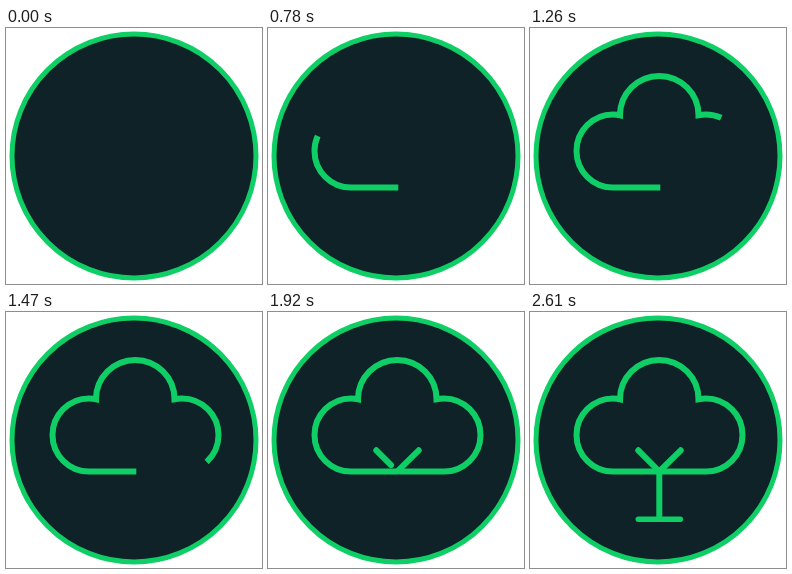
Animation, 256 px wide and 256 px high, one loop 3300 ms. Source, as an HTML page:

```html
<!DOCTYPE html>
<html lang="en">
<head>
<meta charset="utf-8">
<title>Cloud tree</title>
<style>
html, body { margin: 0; width: 100%; height: 100%; overflow: hidden; background: #fff; }
svg { display: block; width: 100%; height: 100%; }
</style>
</head>
<body>
<svg viewBox="0 0 256 256" fill="none" stroke="#10ce66" stroke-width="6">
  <circle cx="128" cy="128" r="122" fill="#0e2228" stroke-width="5"/>
  <path id="cloud" stroke-miterlimit="10" d="M130.3 159.5H83A36.5 36.5 0 0 1 83 86.5Q86.700 86.500 90 87.200A39 39 0 0 1 168.500 87.200Q172 86.500 176 86.500A36.500 36.500 0 0 1 176 159.500H130"/>
  <g stroke-linecap="round">
    <path id="left"/>
    <path id="right"/>
    <path id="trunk"/>
    <path id="base"/>
  </g>
</svg>
<script>
const LOOP = 3300;
const el = id => document.getElementById(id);
const cloud = el("cloud");
const total = cloud.getTotalLength();
const span = (t, a, b) => Math.min(1, Math.max(0, (t - a) / (b - a)));

// cubic-bezier(.42, 0, .58, 1), solved by bisection
function easeInOut(x) {
  if (x <= 0 || x >= 1) return x;
  let lo = 0, hi = 1, s = 0.5;
  for (let i = 0; i < 24; i++) {
    s = (lo + hi) / 2;
    const bx = 3 * s * (1 - s) * (0.42 * (1 - s) + 0.58 * s) + s * s * s;
    if (bx < x) lo = s; else hi = s;
  }
  return s * s * (3 - 2 * s);
}
const easeOut = x => 1 - Math.pow(1 - x, 4);

function line(id, x1, y1, x2, y2, p, width = 6) {
  const node = el(id);
  node.style.display = p > 0 ? "" : "none";
  node.setAttribute("d", `M${x1} ${y1}L${x1 + (x2 - x1) * p} ${y1 + (y2 - y1) * p}`);
  node.setAttribute("stroke-width", width);
}

function draw(t) {
  const p = easeInOut(span(t, 120, 1990));
  cloud.style.display = p > 0 ? "" : "none";
  cloud.setAttribute("stroke-dasharray", p < 1 ? `${total * p} ${total * 2}` : "none");

  line("left", 108.3, 138.3, 129.3, 159.5, easeInOut(span(t, 1660, 2080)), 6 * span(t, 1610, 1730));
  line("right", 150.7, 138.3, 129.3, 159.5, easeInOut(span(t, 1560, 1980)));
  line("trunk", 129.3, 160, 129.3, 207, easeInOut(span(t, 1930, 2150)));

  const half = 21 * easeOut(span(t, 2100, 2620));
  line("base", 129.3 - half, 207.2, 129.3 + half, 207.2, half > 0 ? 1 : 0, 5.5);
}

const start = performance.now();
function tick() {
  draw((performance.now() - start) % LOOP);
  requestAnimationFrame(tick);
}
tick();
</script>
</body>
</html>
```
